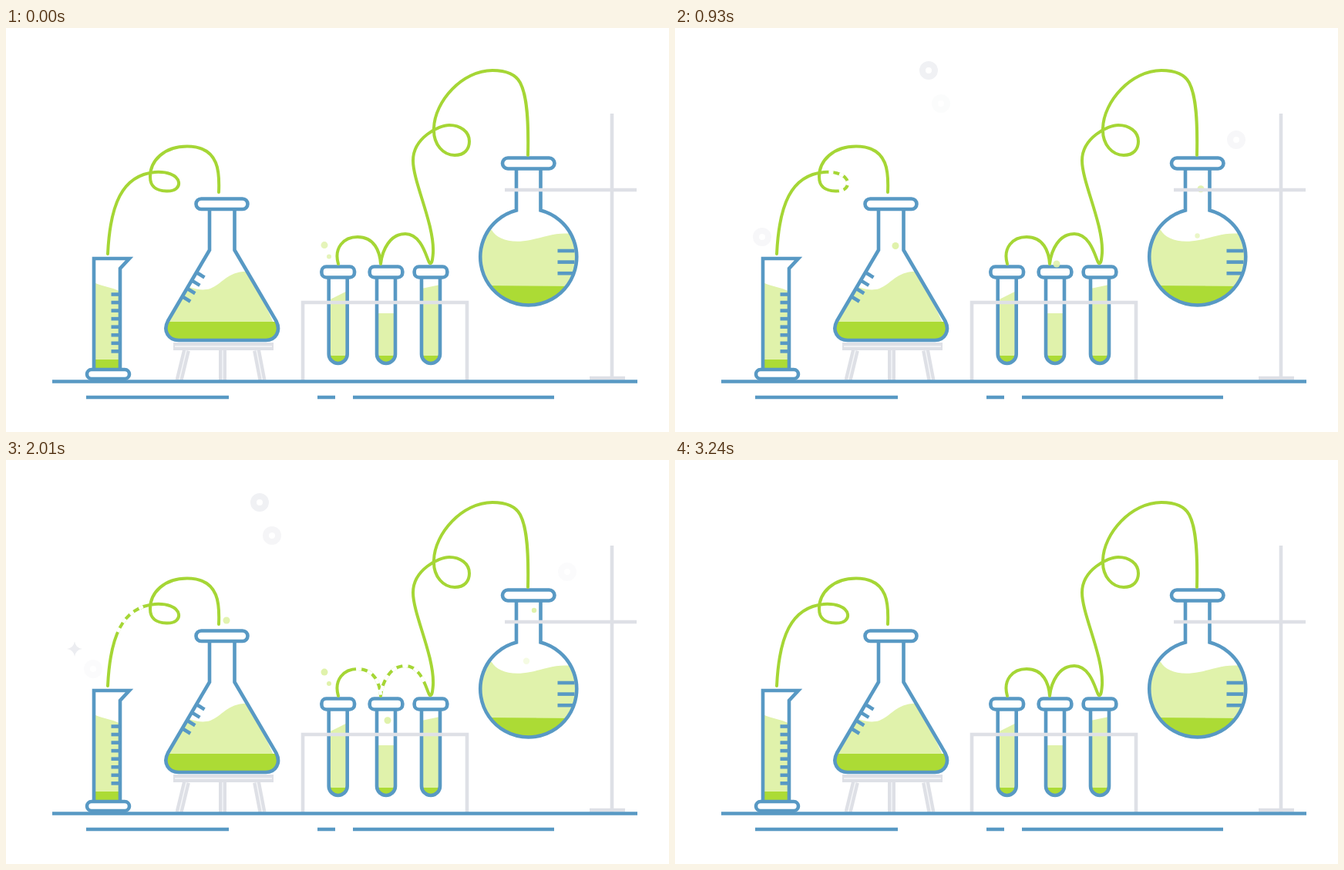
An HTML page that plays this animation: 860 px wide and 524 px high, repeating every 3.33 s.

```html
<!DOCTYPE html>
<html lang="en">
<head>
<meta charset="utf-8">
<title>Laboratory</title>
<style>
  html, body { margin: 0; width: 860px; height: 524px; overflow: hidden; background: #fff; }
  svg { display: block; fill: none; }
  .glass { stroke: #5899c4; stroke-width: 4.6; }
  .cap { fill: #fff; }
  .metal { stroke: #dee0e6; stroke-width: 4.6; }
  .shine { stroke: #f6f7f9; stroke-width: 1.4; }
  .light { fill: #e0f2ab; }
  .dark { fill: #acdb35; }
  .hose { stroke: #a5d635; stroke-width: 4; stroke-linecap: round; stroke-linejoin: round; }
  .pulse { stroke: #fff; stroke-width: 4.4; }
  .ring { stroke: #f0f1f4; stroke-width: 8; }
  .star { fill: #ebecf0; }
</style>
</head>
<body>
<svg width="860" height="524" viewBox="0 0 860 524">
  <defs>
    <clipPath id="bulb"><circle cx="677.5" cy="297" r="62"/></clipPath>
    <clipPath id="cone"><path d="M264 288L210 380C203 393 211 405 224 405H337C350 405 357 393 350.500 380L296.500 288Z"/></clipPath>
    <path id="hoseA" d="M276 213C277 190 278 153.500 235 153.500C205 153.500 187 172 187 193C187 207 196 211 208 211.500C220 212 225 206 224 200C222 190 208 186 193 187C150 191 135 230 132 293"/>
    <path id="hoseB" d="M677 165C678 120 676 88 667 71C660 58 646 55 631 55C592 55 556 95 555 130C554 152 568 165 582 165C595 165 601 157 601 147C601 134 589 126 575 126C562 126 528 142 528 172C528 200 556 255 554 292C553 304 552 306 549.500 305C546 301 540 267 518 267C498 267 488 288 486 306C485 290 478 271 456 271C438 271 425 285 431 306"/>
  </defs>

  <g id="sparks"></g>

  <!-- stool -->
  <path class="metal" style="stroke-width:10" d="M217 413H347M234 418L224.500 457M281 418V457M325 418L332.500 457"/>
  <path class="shine" d="M219 413H345M234 418L224.500 457M281 418V457M325 418L332.500 457"/>

  <!-- cylinder -->
  <path class="light" d="M114 330C124 335 138 336 148 342V431H114Z"/>
  <path class="dark" d="M114 430H148V442H114Z"/>
  <path class="glass" d="M114 442V299H160L148 312V442"/>
  <rect class="glass cap" x="105" y="443" width="55" height="12" rx="6"/>

  <!-- conical flask -->
  <g clip-path="url(#cone)">
    <path class="light" d="M225 331C240 337 252 342 265 338C280 333 288 314 316 316L360 410H200Z"/>
    <path class="dark" d="M200 381H360V410H200Z"/>
  </g>
  <path class="glass" d="M264 236V288L210 380C203 393 211 405 224 405H337C350 405 357 393 350.500 380L296.500 288V236"/>
  <rect class="glass cap" x="246.5" y="221.500" width="67" height="13.500" rx="6.750"/>

  <!-- round flask -->
  <g clip-path="url(#bulb)">
    <path class="light" d="M610 262H630C637 274 655 280 680 275C700 271 712 265 734 267H750V365H610Z"/>
    <path class="dark" d="M610 334L750 335V365H610Z"/>
  </g>
  <path class="glass" d="M662 184V236.500A62.500 62.500 0 1 0 693.500 236.500V184"/>
  <rect class="glass cap" x="644" y="168.500" width="67.500" height="14" rx="7"/>

  <g id="ticks" class="glass"></g>
  <g id="tubes"></g>
  <g id="bubbles" class="light"></g>

  <!-- rack and clamp stand -->
  <path class="metal" d="M385 457V356H598V457M786 111V457M647 210H818M757 454H803"/>

  <path class="glass" d="M60 458.500H819M104 479H289M404 479H427M450 479H711"/>

  <use class="hose" href="#hoseA"/>
  <use class="hose" href="#hoseB"/>
  <use class="pulse" id="pulseA" href="#hoseA"/>
  <use class="pulse" id="pulseB" href="#hoseB"/>
</svg>
<script>
const $ = id => document.getElementById(id);
const LOOP = 3330, STEP = 30, LAST = 3240;
const RISE = .069; // bubble speed, px per ms

function add(parent, tag, attrs) {
  const el = document.createElementNS('http://www.w3.org/2000/svg', tag);
  set(el, attrs);
  return $(parent).appendChild(el);
}

function set(el, attrs) {
  for (const k in attrs) el.setAttribute(k, attrs[k]);
}

// Measuring marks
const tick = (x, y, dx, dy = 0) => add('ticks', 'path', { d: `M${x} ${y}l${dx} ${dy}` });
for (let i = 0; i < 8; i++) tick(136.5, 345.5 + i * 10.55, 11.5);
for (let i = 0; i < 4; i++) tick(247 - i * 6.1, 317 + i * 10.4, 10.5, 6.5);
for (let i = 0; i < 3; i++) tick(715.5, 289 + i * 14.6, 22);

// Test tubes: centre, liquid height at the left and right wall
function testTube(x, left, right) {
  const l = x - 12, r = x + 12;
  add('tubes', 'path', { class: 'light', d: `M${l} ${left}L${r} ${right}V423A12 12 0 0 1 ${l} 423Z` });
  add('tubes', 'path', { class: 'dark', d: `M${l} 425H${r}A12 11 0 0 1 ${l} 425Z` });
  add('tubes', 'path', { class: 'glass', d: `M${l} 324V423A12 12 0 0 0 ${r} 423V324` });
  add('tubes', 'rect', { class: 'glass cap', x: x - 21.3, y: 309.5, width: 42.6, height: 14, rx: 6 });
}
testTube(430.7, 353, 341);
testTube(493, 370, 370);
testTube(551, 338, 333);

// Each mover takes the time and redraws one part.
const movers = [];

// Swells from 0 to 1 and back between start and end.
const swell = (t, start, end) =>
  t > start && t < end ? Math.sin(Math.PI * (t - start) / (end - start)) : 0;

function ring(cx, cy, ...spans) {
  const el = add('sparks', 'circle', { class: 'ring', cx, cy, r: 8 });
  movers.push(t => set(el, { opacity: Math.max(...spans.map(s => swell(t, ...s))) }));
}
ring(329, 55, [150, 1550], [1570, 2560]);
ring(345, 98, [100, 1000], [1250, 2250]);
ring(728, 145, [650, 2150], [2200, 3100]);
ring(113, 271, [650, 2150], [2330, 3100]);

function star(x, y, r, ...spans) {
  const q = r * .14;
  const d = `M0 ${-r}Q${q} ${-q} ${r} 0Q${q} ${q} 0 ${r}Q${-q} ${q} ${-r} 0Q${-q} ${-q} 0 ${-r}Z`;
  const el = add('sparks', 'path', { class: 'star', d });
  movers.push(t => {
    const s = Math.max(...spans.map(span => swell(t, ...span)));
    set(el, { opacity: s, transform: `translate(${x} ${y}) scale(${Math.sqrt(s)})` });
  });
}
star(89, 245, 10, [150, 800], [1680, 2500]);
star(704, 119, 17, [1200, 2000]);

// A bubble leaves (x, y) at each start, rises, and fades at both ends of its life.
function bubble(x, y, r, life, starts, speed = RISE, drift = 0) {
  for (const start of starts) {
    const el = add('bubbles', 'circle', { r });
    movers.push(t => {
      const age = t - start, up = age * speed;
      const opacity = Math.max(0, Math.min(1, age / 120, (life - age) / 200));
      set(el, { cx: x + up * drift, cy: y - up, opacity });
    });
  }
}
bubble(286, 326, 4.5, 1900, [300]);
bubble(267, 326, 3, 400, [300, 1530]);
bubble(287, 318, 3, 400, [1450]);
bubble(413, 284, 4.5, 700, [-100, 1640], .024);
bubble(419, 299, 3, 700, [-100, 1640], .024);
bubble(495, 366, 4.5, 1050, [60, 1600]);
bubble(490, 371, 3, 350, [300, 1520]);
bubble(677, 275, 3.2, 1720, [850], RISE, .1);
bubble(682, 262, 4.5, 600, [520], .13);
bubble(675, 266, 4.2, 600, [1970], .13);
bubble(658, 266, 3, 380, [300, 1530, 2330]);

// A run of white dashes sliding along a hose; place(t) is its rear end.
function pulse(id, count, dash, gap, place) {
  const runs = Array(count).fill([dash, gap]).flat();
  runs[runs.length - 1] = 3000;
  const { style } = $(id);
  style.strokeDasharray = runs.join(' ');
  movers.push(t => { style.strokeDashoffset = -place(t); });
}
pulse('pulseA', 4, 6, 8, t => 370 - 430 * Math.abs(t / 1600 - 1));
pulse('pulseB', 10, 7, 8, t => .817 * (t - 1278));

const begin = performance.now();
function frame() {
  const time = (performance.now() - begin) % LOOP;
  const t = Math.min(Math.floor(time / STEP) * STEP, LAST);
  for (const move of movers) move(t);
  requestAnimationFrame(frame);
}
frame();
</script>
</body>
</html>
```
